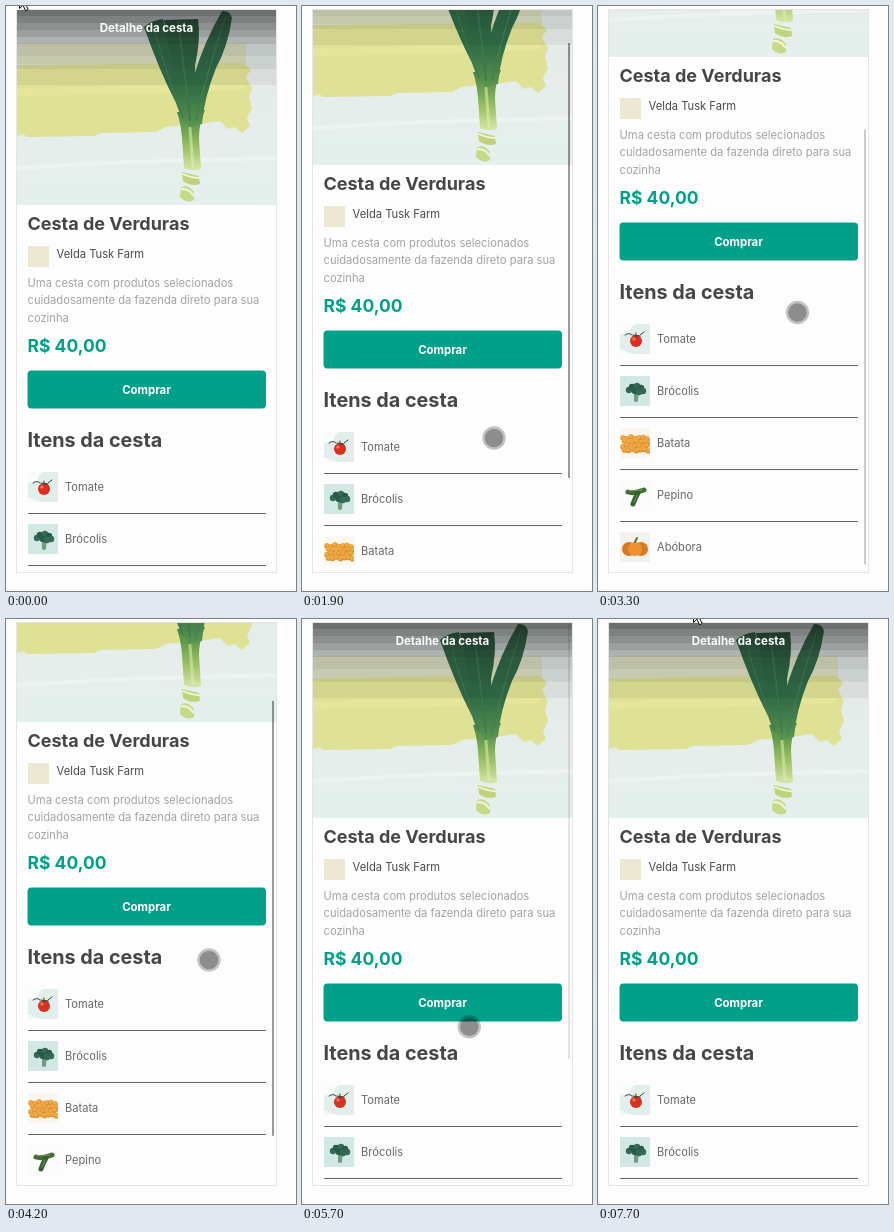
Animation, 290 px wide and 585 px high, one loop 8000 ms. Source, as an HTML page with a canvas:

```html
<!DOCTYPE html>
<html lang="pt">
<head>
<meta charset="utf-8">
<title>Detalhe da cesta</title>
<style>
html, body { margin: 0; width: 100%; height: 100%; overflow: hidden; background: #fdfdfd; }
canvas { display: block; width: 290px; height: 585px; }
</style>
</head>
<body>
<canvas id="stage"></canvas>
<script>
const LOOP = 8000, STEP = 100, MAX_SCROLL = 148;
const canvas = document.getElementById('stage');
const ctx = canvas.getContext('2d');
const ratio = window.devicePixelRatio || 1;
canvas.width = 290 * ratio;
canvas.height = 585 * ratio;

const clamp = (v, lo, hi) => Math.min(hi, Math.max(lo, v));
const ramp = (t, from, to) => clamp((t - from) / (to - from), 0, 1);
const ease = u => u * u * (3 - 2 * u);

// Touch point over time: [ms, x, y]
const touchPath = [
  [200, 20, 4], [1100, 191, 482], [1200, 191, 482], [1300, 192, 472], [1500, 192, 472],
  [1900, 192, 432], [2100, 193, 412], [2200, 193, 412], [2500, 195, 365],
  [3100, 197, 324], [3500, 202, 289], [3700, 203, 289], [3800, 203, 297],
  [3900, 203, 297], [4200, 203, 341], [5000, 202, 416], [5300, 201, 437],
  [5400, 198, 437], [5800, 157, 398], [6000, 156, 391], [6600, 156, 391], [7400, 97, 25]
];

function touchAt(t) {
  let i = 1;
  while (i < touchPath.length - 1 && t > touchPath[i][0]) i++;
  const a = touchPath[i - 1], b = touchPath[i];
  let u = ramp(t, a[0], b[0]);
  if (i === 1 || i === touchPath.length - 1) u = ease(u);
  return { x: a[1] + (b[1] - a[1]) * u, y: a[2] + (b[2] - a[2]) * u };
}

function scrollAt(t, y) {
  if (t < 1500 || t >= 5300) return 0;
  return clamp((t < 3600 ? 472 : 437) - y, 0, MAX_SCROLL);
}

function barAlpha(t) {
  if (t < 1600 || t >= 5800) return 0;
  if (t < 3800) return 1 - ramp(t, 3100, 3500);
  return 1 - ramp(t, 5400, 5800);
}

function buttonAlpha(t) {
  const tap = (down, up) => t < down ? 0 : 1 - ease(ramp(t, up, up + 270));
  return 1 - 0.68 * Math.max(tap(6000, 6130), tap(6600, 6630));
}

function text(str, x, y, size, color, weight = 400, align = 'left') {
  ctx.font = `${weight} ${size}px Inter, "Open Sans", sans-serif`;
  ctx.textAlign = align;
  ctx.fillStyle = color;
  ctx.fillText(str, x, y);
}

function rect(x, y, w, h, color) {
  ctx.fillStyle = color;
  ctx.fillRect(x, y, w, h);
}

function shape(d, color) {
  ctx.fillStyle = color;
  ctx.fill(new Path2D(d));
}

function stroke(d, color, width) {
  ctx.strokeStyle = color;
  ctx.lineWidth = width;
  ctx.lineCap = 'round';
  ctx.stroke(new Path2D(d));
}

function dot(x, y, r, color) {
  ctx.fillStyle = color;
  ctx.beginPath();
  ctx.arc(x, y, r, 0, 7);
  ctx.fill();
}

function fade(y0, y1, stops) {
  const g = ctx.createLinearGradient(0, y0, 0, y1);
  stops.forEach(([at, color]) => g.addColorStop(at, color));
  return g;
}

function photo() {
  ctx.save();
  ctx.beginPath();
  ctx.rect(11, 4, 259, 195);
  ctx.clip();
  rect(11, 4, 259, 195, fade(4, 199, [[0, '#e2e7e6'], [0.7, '#e6eeec'], [1, '#e4f0ed']]));
  shape('M11 160 L120 154 L270 150 L270 154 L120 158 L11 164Z', '#edf3f2');
  // Painted band
  shape('M11 59 L110 58 L238 57 L245 64 L240 71 L246 82 L243 90 L246 102 L241 112 L244 120 L236 127 L229 121 L222 123 L214 115 L200 117 L160 121 L150 126 L95 127 L88 130 L20 131 L18 128 L11 130Z',
    '#dfe195');
  shape('M11 82 L130 80 L238 79 L240 84 L130 88 L11 90Z', 'rgba(235,236,160,.5)');
  rect(11, 37, 229, 21, 'rgba(218,216,150,.45)');
  leek();
  const shades = [0.57, 0.49, 0.42, 0.35, 0.26, 0.17, 0.12, 0.06];
  const tops = [4, 10, 17, 24, 31, 38, 50, 63, 79];
  shades.forEach((a, i) => rect(11, tops[i], 259, tops[i + 1] - tops[i], `rgba(20,24,24,${a})`));
  ctx.restore();
}

function leek() {
  // Stem
  shape('M171 106 Q175 118 176 132 L178 162 Q186 166 195 163 L193 132 Q193 117 199 104Z',
    fade(100, 164, [[0, '#3f7a42'], [0.35, '#6ba04e'], [0.7, '#a5c76c'], [1, '#d8e6a9']]));
  stroke('M184 122 L187 161', 'rgba(226,238,180,.55)', 3);
  // Leaves
  const green = dark => fade(12, 122, [[0, dark], [0.6, '#2f6a44'], [1, '#5a9650']]);
  shape('M138 21 Q146 14 157 13 Q166 50 184 84 L186 121 Q176 116 170 97 Q153 64 138 21Z', green('#2f6546'));
  shape('M216 5 Q224 4 226 12 Q222 40 210 62 Q198 92 196 118 L182 121 Q180 96 188 70 Q198 36 216 5Z', green('#306447'));
  shape('M158 14 L192 13 Q195 32 189 60 Q191 90 190 117 Q184 123 180 112 Q172 78 164 46Z', green('#28583e'));
  stroke('M172 15 Q178 62 184 114', '#42754f', 1.5);
  stroke('M147 20 Q160 65 177 112', '#427650', 1.2);
  stroke('M219 12 Q200 70 190 114', '#467a52', 1.2);
  // Slices
  shape('M176 166 L193 170 L194 178 Q185 181 177 175Z', '#bfd37c');
  stroke('M177 168 Q186 172 193 172', '#edf2cf', 2);
  shape('M175 181 Q182 178 188 186 L188 194 Q181 198 174 191Z', '#c6d984');
  stroke('M176 183 Q183 183 187 189', '#eef3d2', 2.5);
}

const thumbs = {
  Tomate() {
    rect(0, 0, 30, 30, '#e1eeec');
    shape('M0 0 L15 0 Q9 4 10 8 L0 11Z', '#fafcfb');
    shape('M0 25 L12 30 L0 30Z', '#f7faf9');
    dot(16, 17, 6, '#d9301f');
    dot(14, 15, 1.8, '#f0715d');
    stroke('M5 11 Q9 8 12 11 M13 11 L20 12 M16 9 L16 13 M20 11 L24 8', '#394535', 1);
  },
  Brócolis() {
    rect(0, 0, 30, 30, '#d2e8e5');
    shape('M14 14 L19 14 L18 25 Q16 27 14 25Z', '#709d82');
    [[9, 14], [12, 11], [17, 10], [21, 12], [23, 15], [15, 15], [19, 16]]
      .forEach(([x, y], i) => dot(x, y, 3.2, i % 2 ? '#285b49' : '#346a53'));
  },
  Batata() {
    rect(0, 0, 30, 30, '#fbf7ef');
    for (let i = 0; i < 28; i++) {
      const line = Math.floor(i / 7);
      const x = 3 + (i % 7) * 4 + (line % 2) * 1.5, y = 10 + line * 4 + Math.sin(i * 2.4);
      dot(x, y, 2.7, '#d88a2a');
      dot(x - 0.3, y - 0.5, 2.1, '#efaa45');
    }
  },
  Pepino() {
    rect(0, 0, 30, 30, '#fbfcfa');
    stroke('M8 12 Q14 14 24 10', '#426b35', 5);
    stroke('M18 13 Q15 18 13 24', '#36602e', 5);
    stroke('M9 11 L22 10 M17 15 L14 22', '#759563', 1);
  },
  Abóbora() {
    rect(0, 0, 30, 30, '#f4f2ec');
    [9, 21, 15].forEach((x, i) => dot(x, 17, 7, i === 2 ? '#ec9134' : '#d97823'));
    stroke('M15 10 L17 6', '#687344', 2);
  }
};

function row(name, i) {
  const y = 466 + 52 * i;
  ctx.save();
  ctx.translate(22, y);
  ctx.beginPath();
  ctx.rect(0, 0, 30, 30);
  ctx.clip();
  thumbs[name]();
  ctx.restore();
  text(name, 59, y + 18.5, 11.1, '#686868');
  rect(22, y + 41, 238, 1, '#646464');
}

function button(alpha) {
  ctx.fillStyle = `rgba(0,161,136,${alpha})`;
  ctx.beginPath();
  ctx.roundRect(21.5, 364.5, 238.5, 38, 4);
  ctx.fill();
  text('Comprar', 140.5, 387.5, 11.4, '#fff', 700, 'center');
}

function page(t, scroll) {
  ctx.save();
  ctx.beginPath();
  ctx.rect(11, 4, 259, 562);
  ctx.clip();
  ctx.translate(0, -Math.round(scroll));
  photo();
  text('Detalhe da cesta', 140.5, 26, 11.5, '#fff', 700, 'center');
  text('Cesta de Verduras', 21.5, 224, 18, '#464646', 700);
  rect(22, 240, 21, 21, '#ece8d3');
  text('Velda Tusk Farm', 50.5, 252, 11.2, '#4a4a4a');
  ['Uma cesta com produtos selecionados', 'cuidadosamente da fazenda direto para sua', 'cozinha']
    .forEach((line, i) => text(line, 21.5, 281 + 17.4 * i, 11.2, '#a3a3a3'));
  text('R$ 40,00', 21.5, 346, 17.5, '#00a188', 700);
  button(buttonAlpha(t));
  text('Itens da cesta', 21.5, 441, 19.8, '#464646', 700);
  Object.keys(thumbs).forEach(row);
  ctx.restore();
}

function arrow(x, y) {
  ctx.save();
  ctx.translate(x, y);
  const d = 'M.5 .5 L.5 16.5 L4 13.2 L6.6 18.8 L9.2 17.6 L6.6 12.2 L11.5 12.2Z';
  shape(d, '#fff');
  stroke(d, '#111', 1);
  ctx.restore();
}

function pointer(t, p) {
  if (t < 300) arrow(13, -14);
  else if (t >= 7500) arrow(t < 7700 ? 98 : 95, -13);
  else {
    dot(p.x, p.y, 11.7, 'rgba(0,0,0,.23)');
    dot(p.x, p.y, 9.3, 'rgba(0,0,0,.27)');
  }
}

function draw(t) {
  const p = touchAt(t);
  const scroll = scrollAt(t, p.y);
  ctx.setTransform(ratio, 0, 0, ratio, 0, 0);
  rect(0, 0, 290, 585, '#fdfdfd');
  page(t, scroll);
  ctx.strokeStyle = '#e3e6e5';
  ctx.lineWidth = 1;
  ctx.strokeRect(10.5, 3.5, 260, 563);
  rect(266, 5 + 0.8 * scroll, 2, 435, `rgba(0,0,0,${0.4 * barAlpha(t)})`);
  pointer(t, p);
}

const start = performance.now();
function tick() {
  const t = (performance.now() - start) % LOOP;
  draw(Math.floor(t / STEP) * STEP);
  requestAnimationFrame(tick);
}
tick();
</script>
</body>
</html>
```
